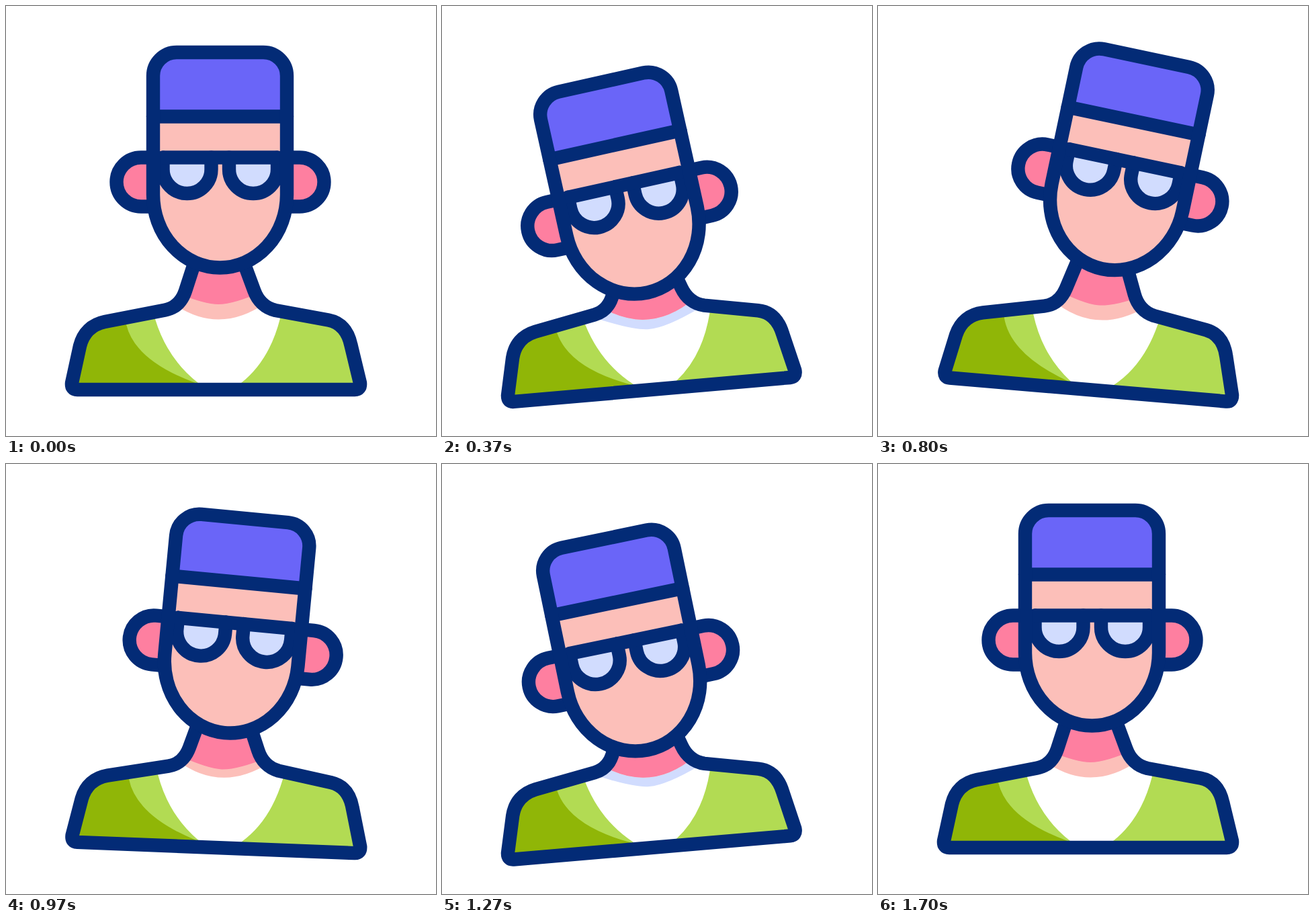
An HTML page for the animation above (2 s loop, 640 by 640 pixels).

```html
<!DOCTYPE html>
<html lang="en">
<head>
<meta charset="utf-8">
<title>Nodding man</title>
<style>
  html, body { margin: 0; width: 100%; height: 100%; overflow: hidden; background: #fff; }
  svg { display: block; width: 100%; height: 100%; }
  .line { fill: none; stroke: #032b76; stroke-width: 20.4; stroke-linecap: round; stroke-linejoin: round; }
</style>
</head>
<body>
<svg viewBox="0 0 640 640">
  <defs>
    <path id="torso" d="M284.500 370 L267 424 C262 439 252 449.500 237 452.500 L147 470 C128 474 115 486 110 506 L98 561 Q97 571 106 571 H519 Q528 571 527 561 L513.500 505 C509 484 498 471 480 467.500 L401 453 C386 449.500 375 439 369.500 424 L349.500 370"/>
    <path id="neck" d="M270 360 H366 L388 441 Q316 492 246 441 Z"/>
    <path id="shade" d="M222 300 V414 L232 418 Q292 444 316 444 Q342 444 392 420 V300 Z"/>
    <path id="skull" d="M219 104 A35 35 0 0 1 254 69 H383 A35 35 0 0 1 418 104 V281 A99.500 108.500 0 0 1 219 281 Z"/>
    <path id="cap" d="M219 164.500 V104 A35 35 0 0 1 254 69 H383 A35 35 0 0 1 418 104 V164.500 Z"/>
    <path id="ears" d="M219 225.500 H201 A36.500 36.500 0 0 0 201 298.500 H219 M418 225.500 H437 A36.500 36.500 0 0 1 437 298.500 H418"/>
    <path id="lenses" d="M233.500 225.500 V243 A36 36 0 0 0 305.500 243 V225.500 M332 225.500 V243 A36 36 0 0 0 404 243 V225.500"/>
    <clipPath id="inTorso"><use href="#torso"/></clipPath>
    <clipPath id="inNeck"><use href="#neck"/></clipPath>
  </defs>

  <g id="body">
    <g clip-path="url(#inTorso)">
      <use href="#torso" fill="#fff"/>
      <use class="shade" href="#shade" fill="#d1dcfe"/>
      <use href="#neck" fill="#fcbfb9"/>
      <g clip-path="url(#inNeck)"><use class="shade" href="#shade" fill="#fe7fa0"/></g>
      <path fill="#b2db53" d="M80 440 H214 L222 466 Q240 525 286 561 V580 H80 Z M540 440 H412 L408 465 Q392 528 350 561 V580 H540 Z"/>
      <path fill="#90b607" d="M80 440 H172 L179 474 Q192 528 282 561 V580 H80 Z"/>
    </g>
    <use href="#torso" class="line"/>

    <g id="head">
      <use href="#ears" fill="#fe7fa0"/>
      <use href="#ears" class="line"/>
      <use href="#skull" fill="#fcbfb9"/>
      <use href="#cap" fill="#6a65f8"/>
      <use href="#lenses" fill="#d1dcfe"/>
      <use href="#lenses" class="line"/>
      <path class="line" d="M219 164.500 H418 M234 225.500 H403"/>
      <use href="#skull" class="line"/>
    </g>
  </g>
</svg>
<script>
const LOOP = 2000;
const swayTimes = [0, 367, 833, 1233, 1633];
const tiltTimes = [0, 355, 857, 1177, 1665];
const body = document.getElementById('body');
const head = document.getElementById('head');
const shades = document.querySelectorAll('.shade');

// Eased value between keys; holds the last one.
function at(t, times, values) {
  const i = times.findIndex(k => k > t);
  if (i < 0) return values[values.length - 1];
  const u = (t - times[i - 1]) / (times[i] - times[i - 1]);
  return values[i - 1] + (values[i] - values[i - 1]) * u * u * (3 - 2 * u);
}

function draw(now) {
  const t = now % LOOP;
  const sway = at(t, swayTimes, [0, -5, 5, -5, 0]);
  const drop = at(t, swayTimes, [0, 37, 0, 37, 0]);
  const tilt = at(t, tiltTimes, [0, -7.6, 7.6, -7.6, 0]);
  body.setAttribute('transform', `rotate(${sway} 312 571)`);
  head.setAttribute('transform', `translate(0 ${drop}) rotate(${tilt} 318.5 387)`);
  shades.forEach(s => s.setAttribute('transform', `translate(0 ${drop})`));
}

const start = performance.now();
function tick() {
  draw(performance.now() - start);
  requestAnimationFrame(tick);
}
tick();
</script>
</body>
</html>
```
